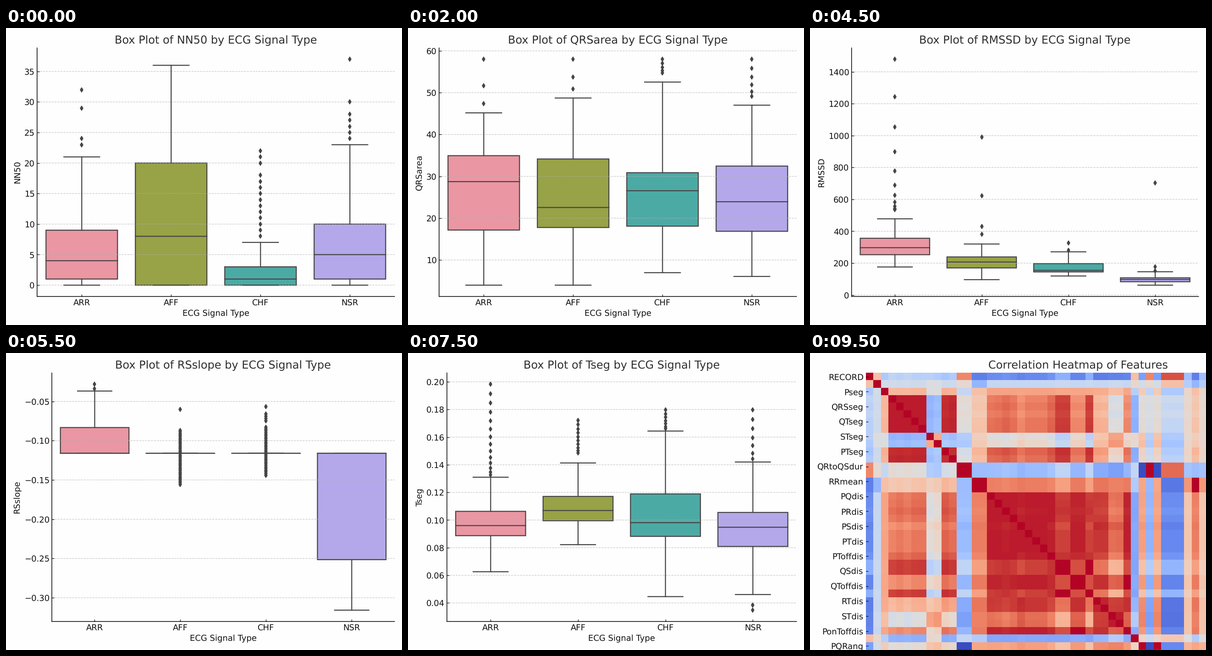
Recreate the animation shown at these times as a matplotlib script. Size 864 px wide and 648 px high, loop 10000 ms.

```python
import numpy as np
import matplotlib.pyplot as plt
from matplotlib.animation import FuncAnimation
from matplotlib.patches import Rectangle

W, H, DPI = 864, 648, 108
SIGNALS = ["ARR", "AFF", "CHF", "NSR"]
FILLS = ["#ea96a3", "#98a246", "#4caaa5", "#b4a8eb"]
LINE, INK, TITLE_INK, PAPER = "#454545", "#111111", "#2e2e2e", "#fefefe"

plt.rcParams.update({
    "font.family": "DejaVu Sans", "font.size": 10, "text.hinting": "none",
    "axes.titlesize": 16, "axes.labelsize": 12,
    "xtick.labelsize": 12, "ytick.labelsize": 12,
    "xtick.direction": "in", "ytick.direction": "in",
    "axes.spines.top": False, "axes.spines.right": False,
    "axes.linewidth": 1.0, "axes.titlecolor": TITLE_INK, "axes.labelcolor": INK,
    "xtick.labelcolor": INK, "ytick.labelcolor": INK,
    "axes.facecolor": PAPER, "path.snap": False,
})

fig = plt.figure(figsize=(W / DPI, H / DPI), dpi=DPI, facecolor=PAPER)
scenes = []


# Box plots

def tail(start, stop, count, power=1):
    """Outliers that thin out towards the far end as the power grows."""
    return start + (stop - start) * np.linspace(0, 1, count) ** power


def box(low, q1, median, q3, high, *outliers):
    return (low, q1, median, q3, high), np.hstack([[], *outliers])


def add_boxes(feature, *boxes):
    scenes.append(lambda: draw_boxes(feature, boxes))


def add_typical(feature, low, high):
    """Four mildly skewed boxes spread over the given range."""
    rng = np.random.default_rng(len(scenes))
    boxes = []
    for _ in SIGNALS:
        cuts = np.array([0, 0.25, 0.4, 0.55, 0.82]) + rng.normal(0, 0.035, 5)
        cuts = np.sort(cuts.clip(0, 0.9))
        outliers = tail(cuts[-1] + 0.04, 1, rng.integers(2, 7), 1.3)
        boxes.append(box(*low + (high - low) * cuts, low + (high - low) * outliers))
    add_boxes(feature, *boxes)


def finish(ax, title, ylabel):
    ax.set_xlim(-0.5, 3.5)
    ax.set_xticks(range(4), SIGNALS)
    ax.set_title(title)
    ax.set_xlabel("ECG Signal Type")
    ax.set_ylabel(ylabel)
    ax.grid(axis="y", linestyle="--", alpha=0.7)
    fig.tight_layout()


def draw_boxes(feature, boxes):
    ax = fig.add_subplot()

    def stroke(xs, ys):
        ax.plot(xs, ys, color=LINE, linewidth=1.5)

    for x, ((low, q1, median, q3, high), outliers) in enumerate(boxes):
        ax.add_patch(Rectangle((x - 0.4, q1), 0.8, q3 - q1, facecolor=FILLS[x],
                               edgecolor=LINE, linewidth=1.5))
        for edge, end in ((q1, low), (q3, high)):
            stroke([x, x], [edge, end])
            stroke([x - 0.2, x + 0.2], [end, end])
        stroke([x - 0.4, x + 0.4], [median, median])
        ax.plot([x] * len(outliers), outliers, "d", color=LINE, markersize=5)
    finish(ax, f"Box Plot of {feature} by ECG Signal Type", feature)


def draw_counts():
    ax = fig.add_subplot()
    ax.bar(range(4), 300, width=0.8, color=FILLS)
    finish(ax, "Distribution of ECG Signal Types", "Count")


# Heatmap: correlations follow from a few hidden traits of each feature.

def trait(angle, strength, offset=0, rate=0, count=1, spread=0):
    """Loadings on distance and width (as an angle), Q offset and heart rate."""
    angles = np.radians(angle + spread * trait_rng.uniform(-1, 1, count))
    ones = np.ones(count)
    return np.column_stack([strength * np.cos(angles), strength * np.sin(angles),
                            offset * ones, rate * ones])


trait_rng = np.random.default_rng(4)
qs_width = trait(28, 0.97)
qt_length = trait(-2, 0.97)
rr_interval = trait(-17, 0.68, -0.05, 0.7)
pqr_angle = trait(-35, 0.61, -0.8)
variability = trait(-20, 0.27, -0.25, 0.45)
LOADINGS = np.vstack([
    trait(158, 0.8, 0.15, -0.3),
    trait(180, 0.17, 0, -0.5),
    trait(10, 0.46),
    trait(50, 0.98, count=5, spread=5),
    trait(-95, 0.65, count=2, spread=18),
    trait(42, 0.96, count=2, spread=4),
    trait(138, 0.6, 0.85, count=2),
    rr_interval, rr_interval,
    trait(3, 0.98, count=9, spread=8),
    qs_width, qs_width, qt_length, qt_length, qs_width,
    trait(-15, 0.97, count=2, spread=4),
    trait(-41, 0.98, count=2, spread=6),
    qt_length,
    trait(200, 0.58, -0.4),
    pqr_angle, -pqr_angle, pqr_angle,
    trait(152, 0.85, 0.25, -0.3, count=3),
    variability, rr_interval, variability,
])
HEAT = LOADINGS @ LOADINGS.T
HEAT[(LOADINGS[:, None] == LOADINGS).all(axis=-1)] = 1
HEAT_LABELS = ("RECORD Pseg QRSseg QTseg STseg PTseg QRtoQSdur RRmean PQdis PRdis PSdis "
               "PTdis PToffdis QSdis QToffdis RTdis STdis PonToffdis PQRang").split()


def draw_heatmap():
    left, top, width, height, count = 122, 43.5, 926, 914, 56
    ax = fig.add_axes([left / W, 1 - (top + height) / H, width / W, height / H])
    ax.pcolormesh(HEAT, cmap="coolwarm", vmin=-1, vmax=1, snap=True)
    ax.set_xlim(0, count)
    ax.set_ylim(count, 0)
    ax.set_xticks([])
    ax.set_yticks(np.arange(len(HEAT_LABELS)) * 2 + 0.5, HEAT_LABELS)
    ax.spines[:].set_visible(False)
    ax.set_title("Correlation Heatmap of Features")


# Scenes in showing order

add_boxes("NN50",
          box(0, 1, 4, 9, 21, 23, 24, 29, 32),
          box(0, 0, 8, 20, 36),
          box(0, 0, 1, 3, 7, range(8, 19), range(20, 23)),
          box(0, 1, 5, 10, 23, range(24, 29), 30, 37))
add_typical("PQseg", 0, 0.18)
add_boxes("PQslope",
          box(-0.0908, -0.0589, -0.0253, -0.0171, -0.0053),
          box(-0.1355, -0.1025, -0.0611, -0.0262, -0.0088),
          box(-0.1372, -0.1122, -0.0930, -0.0330, -0.0107),
          box(-0.2201, -0.1719, -0.0875, -0.0507, -0.0258))
add_typical("Pseg", 0.03, 0.15)
add_typical("QRSarea", 4, 58)
add_typical("QRSperi", 11, 83)
add_boxes("QRSseg",
          box(0, 0.0218, 0.0745, 0.0918, 0.1202),
          box(0, 0.0197, 0.0422, 0.0664, 0.1025),
          box(0, 0.0028, 0.0183, 0.0734, 0.1110),
          box(0.0006, 0.0232, 0.0685, 0.0831, 0.0919))
add_typical("QRseg", 0, 0.064)
add_typical("QRslope", 0, 0.32)
add_boxes("RMSSD",
          box(176, 253, 297, 356, 478, tail(536, 1479, 12, 3)),
          box(96.5, 170, 207, 239, 320, tail(382, 992, 4, 2.3)),
          box(119.5, 145, 155, 197, 271, 280, 328),
          box(62, 83.5, 98, 108, 146, 150, 176, 703))
add_typical("RSseg", 0, 0.062)
FLAT = -0.1161
add_boxes("RSslope",
          box(FLAT, FLAT, FLAT, -0.0833, -0.0368, -0.0336, -0.0281),
          box(FLAT, FLAT, FLAT, FLAT, FLAT, tail(-0.1556, -0.087, 36), -0.0599),
          box(FLAT, FLAT, FLAT, FLAT, FLAT, tail(-0.1439, -0.083, 30),
              tail(-0.0746, -0.0658, 4), -0.0564),
          box(-0.3158, -0.2515, FLAT, FLAT, FLAT))
add_typical("SDSD", 60, 1470)
add_typical("STseg", 0, 0.24)
add_typical("STslope", 0, 0.112)
add_boxes("Tseg",
          box(0.0626, 0.0887, 0.0960, 0.1063, 0.1310, tail(0.1327, 0.1983, 14, 1.4)),
          box(0.0822, 0.0995, 0.1069, 0.1171, 0.1413, tail(0.1485, 0.1721, 10, 1.2)),
          box(0.0446, 0.0882, 0.0981, 0.1189, 0.1644, tail(0.1660, 0.1796, 7, 1.2)),
          box(0.0461, 0.0809, 0.0948, 0.1055, 0.1420, 0.0348, 0.0385,
              tail(0.1443, 0.1796, 7, 1.2)))
add_typical("hbpermin", 46, 134)
add_typical("pNN50", 0, 48)
scenes += [draw_counts, draw_heatmap]


def update(frame):
    fig.clear()
    fig.subplots_adjust(left=0.1, right=0.98, bottom=0.1, top=0.93)
    scenes[frame]()
    return fig.axes


animation = FuncAnimation(fig, update, frames=len(scenes), interval=500,
                          init_func=lambda: [], repeat=True, repeat_delay=0)
plt.show()
```
